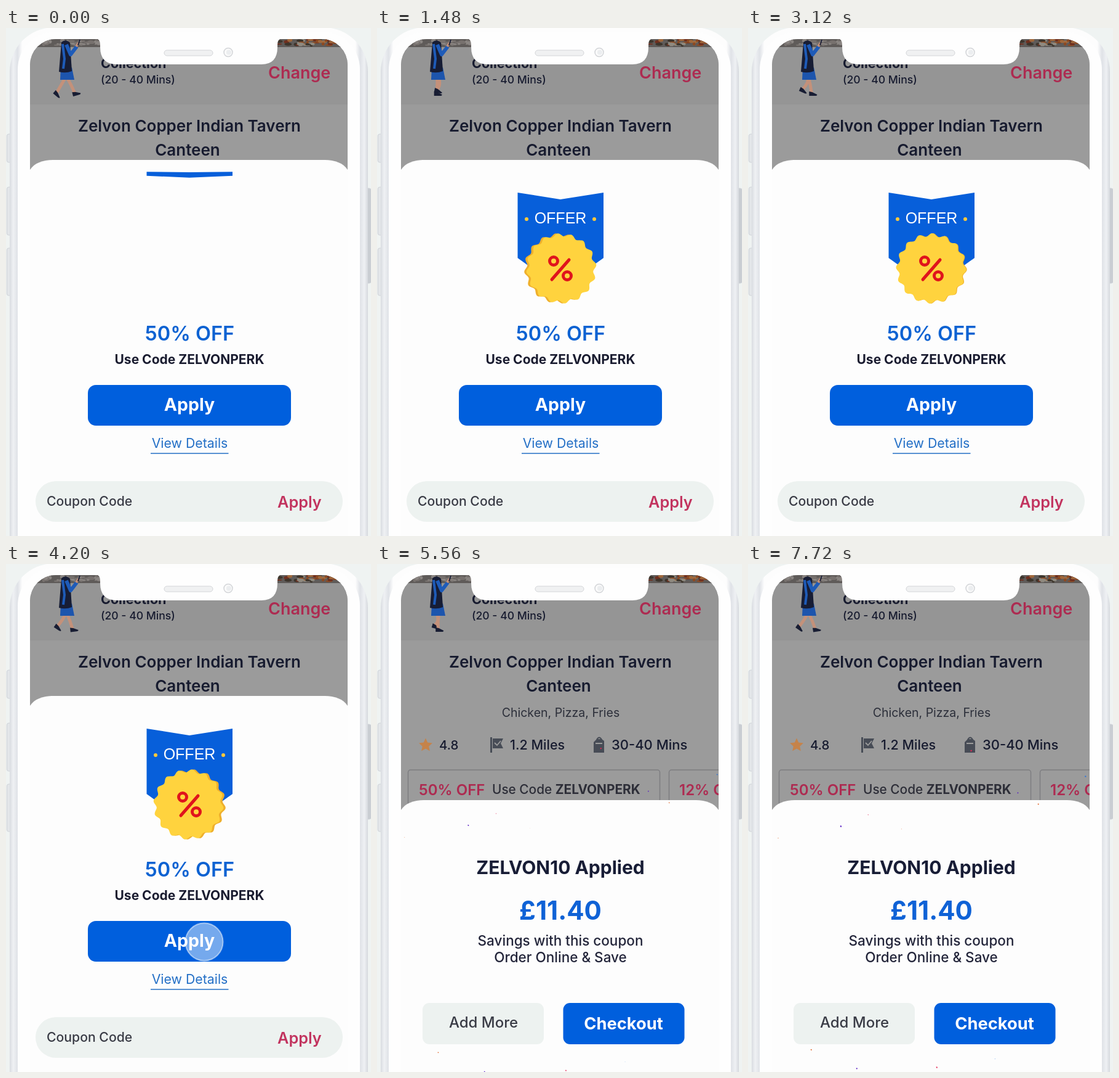
Recreate the animation shown at these times as an HTML page. Size 593 by 824 pixels, loop 7760 ms.

```html
<!DOCTYPE html>
<html lang="en">
<head>
<meta charset="utf-8">
<title>Coupon offer</title>
<style>
  html, body { margin: 0; width: 100%; height: 100%; overflow: hidden; background: #eff3f2; }
  svg { display: block; width: 593px; height: 824px; font-family: Inter, "Open Sans", sans-serif; }
  .mid { text-anchor: middle; }
  .m { font-weight: 500; }
  .s { font-weight: 600; }
  .b { font-weight: 700; }
</style>
</head>
<body>
<svg viewBox="0 0 593 824" xmlns="http://www.w3.org/2000/svg">
  <defs>
    <clipPath id="screen"><rect x="39" y="18" width="516" height="900" rx="42"/></clipPath>
    <linearGradient id="edge">
      <stop offset="0" stop-color="#d9dce1"/><stop offset=".01" stop-color="#eff1f4"/>
      <stop offset=".022" stop-color="#dfe2e7"/><stop offset=".035" stop-color="#fdfdfd"/>
      <stop offset=".965" stop-color="#fdfdfd"/><stop offset=".978" stop-color="#dfe2e7"/>
      <stop offset=".99" stop-color="#eff1f4"/><stop offset="1" stop-color="#d5d8dd"/>
    </linearGradient>
    <path id="sheet" d="M39 16 C46 5 60 0 76 0 H518 C534 0 548 5 555 16 V900 H39 Z" fill="#fdfdfd"/>
  </defs>

  <rect width="593" height="824" fill="#eff3f2"/>
  <g fill="#e3e6e9" stroke="#cfd3d8">
    <rect x="1.5" y="172" width="8" height="46" rx="3"/>
    <rect x="1.5" y="258" width="8" height="78" rx="3"/>
    <rect x="1.5" y="357" width="8" height="77" rx="3"/>
    <rect x="584" y="260" width="9" height="154" rx="3" fill="#c9cdd2"/>
  </g>
  <rect x="6" y="-1" width="582" height="1000" rx="72" fill="url(#edge)"/>
  <rect x="19" y="6" width="556" height="1000" rx="61" fill="#fefefe"/>

  <g clip-path="url(#screen)">
    <rect x="39" y="18" width="516" height="806" fill="#9b9b9b"/>
    <rect x="39" y="18" width="516" height="106" fill="#959595"/>
    <rect x="39" y="18" width="516" height="13" fill="#5f5b59"/>
    <g id="photo"></g>

    <g id="walker">
      <g id="legs" fill="none" stroke="#c4917a" stroke-width="5" stroke-linecap="round"></g>
      <path d="M89 64H107L111 84H88Z" fill="#1d55ad"/>
      <path d="M90 23 Q97 17 104 24 L107 70 Q97 74 86 71Z" fill="#171d35"/>
      <path d="M98 27 L105 43 L115 30" fill="none" stroke="#1e5bb8" stroke-width="6" stroke-linejoin="round"/>
      <path d="M92 26 L95 50 L93 66" fill="none" stroke="#1e5bb8" stroke-width="4"/>
      <path d="M114 30 L118 24" stroke="#c4917a" stroke-width="4"/>
      <path d="M117 28 L120 19" stroke="#20243a" stroke-width="2"/>
    </g>

    <g fill="#171b2f">
      <text class="b" x="154" y="65" font-size="21.5">Collection</text>
      <text class="m" x="154" y="90" font-size="17.6">(20 - 40 Mins)</text>
      <g class="mid s" font-size="26">
        <text x="298" y="168">Zelvon Copper Indian Tavern</text>
        <text x="295" y="207">Canteen</text>
      </g>
      <text class="mid" x="298.5" y="248" font-size="19.5" fill="#2c2f3a">Chicken, Pizza, Fries</text>
      <g class="m" font-size="21.5">
        <text x="101" y="301" font-size="20.5">4.8</text>
        <text x="216" y="301">1.2 Miles</text>
        <text x="381" y="301" font-size="22">30-40 Mins</text>
      </g>
    </g>
    <text class="s" x="426" y="82" font-size="27" fill="#ad2b51">Change</text>
    <path id="star" fill="#c5834a"/>
    <g fill="#474c56">
      <path d="M184 281h3v25h-3z M188 283h17l-4 8 4 8h-17z"/>
      <path d="M354 287l3-3h8l4 3v19h-17v-17z"/>
      <path d="M357 285q4-7 8 0" fill="none" stroke="#474c56" stroke-width="2"/>
    </g>
    <path d="M191 290l4 4 6-7M355 291h11" fill="none" stroke="#9b9b9b" stroke-width="1.8"/>
    <g fill="none" stroke="#7d7d80" stroke-width="1.5">
      <rect x="50.500" y="334" width="409" height="70" rx="4"/>
      <rect x="474.500" y="334" width="409" height="70" rx="4"/>
    </g>
    <g class="s" font-size="24" fill="#ad2b51">
      <text x="68" y="375">50% OFF</text><text x="491" y="375">12% OFF</text>
    </g>
    <text x="187" y="373" font-size="20.8" fill="#2d2e38"><tspan class="m">Use Code </tspan><tspan class="b">ZELVONPERK</tspan></text>

    <g id="offer">
      <use href="#sheet" y="214"/>
      <g id="ribbon">
        <path d="M-69.500 0L0 11L70 0V106L0 156L-69.500 106Z" fill="#075fda"/>
        <g id="label">
          <text class="mid" y="50" font-size="25" fill="#fff" style="font-family:'Liberation Sans',Arial,sans-serif">OFFER</text>
          <g fill="#ffc93a"><circle cx="-55" cy="43" r="3"/><circle cx="55" cy="43" r="3"/></g>
        </g>
      </g>
      <g id="seal">
        <path id="sealBack" fill="#efb02c"/>
        <path id="sealFront" fill="#ffd33e"/>
        <g fill="none" stroke="#e0141c" stroke-width="5" stroke-linecap="round">
          <circle cx="-11" cy="-12" r="6.500"/><circle cx="11" cy="12" r="6.500"/>
          <path d="M14 -14L-14 18"/>
        </g>
      </g>
      <g class="mid">
        <text class="s" x="298.5" y="507" font-size="32.5" fill="#0d62d2">50% OFF</text>
        <text class="b" x="298" y="545" font-size="21" fill="#1a1c30">Use Code ZELVONPERK</text>
        <rect x="133" y="579" width="330" height="66" rx="13" fill="#005fdd"/>
        <text class="b" x="298" y="621" font-size="28.500" fill="#fff">Apply</text>
        <text x="298.5" y="681" font-size="21.300" fill="#236fc6">View Details</text>
      </g>
      <path d="M235 690H361.500" stroke="#236fc6" stroke-width="1.6"/>
      <rect x="48" y="735" width="499" height="66" rx="33" fill="#edf2f0"/>
      <text class="m" x="66" y="775" font-size="21.200" fill="#393b45">Coupon Code</text>
      <text class="s" x="441" y="778" font-size="25.300" fill="#c2345f">Apply</text>
      <circle id="touch" r="30.5" fill="#fff" fill-opacity=".46" stroke="#fff" stroke-opacity=".5" stroke-width="2"/>
    </g>

    <g id="applied">
      <use href="#sheet" y="383"/>
      <g class="mid">
        <text class="b" x="298" y="503" font-size="30" fill="#181d36">ZELVON10 Applied</text>
        <text class="b" x="298" y="577" font-size="42" fill="#0f62d6">£11.40</text>
        <g class="m" font-size="22.500" fill="#23253a">
          <text x="298" y="619">Savings with this coupon</text>
          <text x="298" y="646">Order Online &amp; Save</text>
        </g>
      </g>
      <g id="confetti"></g>
      <g class="mid">
        <rect x="74" y="712" width="197" height="67" rx="11" fill="#edf2f0"/>
        <rect x="302.500" y="712" width="197" height="67" rx="11" fill="#005fdd"/>
        <text class="m" x="173" y="752" font-size="24" fill="#393b45">Add More</text>
        <text class="b" x="400.500" y="755" font-size="27.300" fill="#fff">Checkout</text>
      </g>
    </g>
  </g>

  <path d="M146 17H448Q441 18 441 27V31Q441 59 415 59H180Q153 59 153 31V27Q153 18 146 17Z" fill="#fefefe"/>
  <rect x="257" y="36" width="79" height="9" rx="4.500" fill="#f0f1f2" stroke="#d3d5d8"/>
  <circle cx="361" cy="39.500" r="7" fill="#fafafa" stroke="#d3d5d8" stroke-width="1.500"/>
  <circle cx="362" cy="39.500" r="4" fill="#eceef0"/>
</svg>
<script>
const LOOP = 7760, STEP = 590;
const SWITCH = 4300, BURST = 4600, BURST_EVERY = 2200, BURST_LIFE = 1500;
const NS = 'http://www.w3.org/2000/svg';
const $ = id => document.getElementById(id);
const clamp = v => Math.min(1, Math.max(0, v));
const span = (t, from, to) => clamp((t - from) / (to - from));
const easeOut = p => 1 - (1 - p) ** 3;
const easeBack = p => 1 + 2.4 * (p - 1) ** 3 + 1.4 * (p - 1) ** 2;
const mix = (a, b, p) => a + (b - a) * p;

function add(parent, tag, attrs) {
  const el = document.createElementNS(NS, tag);
  for (const key in attrs) el.setAttribute(key, attrs[key]);
  return parent.appendChild(el);
}
const move = (el, value) => el.setAttribute('transform', value);

let seed = 11;
const random = () => (seed = seed * 16807 % 2147483647) / 2147483647;

// Closed outline around the origin, radius given by angle.
function outline(count, radius, cx = 0, cy = 0) {
  const points = Array.from({ length: count }, (_, i) => {
    const a = i / count * 2 * Math.PI - Math.PI / 2, r = radius(a, i);
    return (cx + r * Math.cos(a)).toFixed(1) + ' ' + (cy + r * Math.sin(a)).toFixed(1);
  });
  return 'M' + points.join('L') + 'Z';
}
const scallop = outline(160, a => 54.5 + 2.6 * Math.cos(16 * a));
$('sealBack').setAttribute('d', scallop);
$('sealFront').setAttribute('d', scallop);
$('star').setAttribute('d', outline(10, (a, i) => i % 2 ? 5.5 : 11.5, 79, 294));

const warm = ['#8d4a22', '#3d352c', '#a0683c', '#6e2f1f', '#8f8a80'];
const grey = ['#77716e', '#4d4948', '#8a8582', '#6a4f48'];
for (let i = 0; i < 90; i++) {
  const right = i % 2, colors = right ? warm : grey;
  add($('photo'), 'ellipse', {
    cx: (right ? 442 : 54) + random() * 98, cy: 19 + random() * 9,
    rx: 2 + random() * 4, ry: 1 + random() * 2, fill: colors[i % colors.length]
  });
}

const legs = [0, 1].map(() => ({
  limb: add($('legs'), 'path', {}),
  shoe: add($('legs'), 'path', { d: 'M-4 -3L1 -2L9 2Q9 4 6 4H-4Z', fill: '#181d33', stroke: 'none' })
}));
function poseLeg({ limb, shoe }, u) {
  const planted = u < 1, s = planted ? u : u - 1;
  const glide = s * s * (3 - 2 * s);
  const x = 97 + (planted ? mix(15, -15, s) : mix(-15, 15, glide));
  const y = 106 - (planted ? 0 : 6 * Math.sin(Math.PI * s ** 0.6));
  const tilt = planted ? mix(-15, 0, clamp(s * 5)) + 40 * span(s, 0.75, 1) : mix(40, -15, s);
  const knee = planted ? 1 : 8 * Math.sin(Math.PI * s);
  limb.setAttribute('d', `M98 78Q${(98 + x) / 2 + knee} ${(78 + y) / 2} ${x} ${y}`);
  move(shoe, `translate(${x} ${y}) rotate(${tilt})`);
}

// Early burst offsets from the centre, in reading order.
const CENTER = [297, 592];
const starts = [
  [-37, -72], [-18, -66], [15, -69], [46, -76], [56, -58], [43, -53], [-44, -54], [-65, -42],
  [-65, 23], [67, 25], [-52, 49], [-27, 55], [57, 56], [3, 65], [-40, 71], [39, 74]
];
const paint = { r: '#e22a55', o: '#e0662a', p: '#5b22c4', b: '#1d6fe0' };
const pieces = [...'rorpbopobroopr pb'.replace(' ', '')].map((c, i) => ({
  el: add($('confetti'), 'path', { d: 'M-6 -2L2 -5L6 3L-2 5Z', fill: paint[c] }),
  start: starts[i], speed: 0.75 + random() * 0.6, spin: random() * 2 - 1, size: 0.75 + random() * 0.4
}));
function drawConfetti(t) {
  const age = (t - BURST) % BURST_EVERY;
  const visible = t >= BURST && age < BURST_LIFE;
  $('confetti').style.display = visible ? '' : 'none';
  if (!visible) return;
  const reach = 4.2 * (1 - Math.exp(-age / 580));
  const late = span(age, 160, BURST_LIFE);
  for (const { el, start, speed, spin, size } of pieces) {
    const k = reach * mix(1, speed, clamp(late * 2));
    const scale = size * span(age, 0, 100) * clamp(1 - late ** 0.9 * (1.1 + Math.abs(spin) * 0.4));
    const x = CENTER[0] + start[0] * k, y = CENTER[1] + start[1] * k + 40 * late * late;
    move(el, `translate(${x} ${y}) rotate(${spin * (age - 160) * 0.4}) scale(${scale})`);
  }
}

function drawOffer(t) {
  const drop = easeBack(span(t, 0, 480));
  move($('ribbon'), `translate(298 ${mix(233, 267, drop)}) scale(1 ${mix(0.052, 1, drop)})`);
  $('label').setAttribute('opacity', span(t, 200, 380));
  const pop = easeBack(span(t, 320, 720));
  const sway = -Math.cos((t - 1480) / 2720 * Math.PI);
  move($('seal'), `translate(298 390) scale(${Math.max(0, pop)})`);
  $('seal').style.display = t < 320 ? 'none' : '';
  move($('sealBack'), `translate(${sway * 2} 0) rotate(${sway * 6})`);
  move($('sealFront'), `translate(${-sway * 1.5} 0) rotate(${sway * 6})`);
  const press = span(t, 3850, 4050) - span(t, 4240, 4360);
  $('touch').setAttribute('opacity', press);
  move($('touch'), `translate(322 613) scale(${mix(1.25, 1, press)})`);
}

function draw(t) {
  poseLeg(legs[0], t / STEP % 2);
  poseLeg(legs[1], (t / STEP + 1) % 2);
  const leave = span(t, SWITCH, SWITCH + 140) ** 2;
  const enter = easeOut(span(t, SWITCH + 100, SWITCH + 320));
  move($('offer'), `translate(0 ${leave * 620})`);
  move($('applied'), `translate(0 ${(1 - enter) * 450})`);
  drawOffer(t);
  drawConfetti(t);
}

const begin = performance.now();
function tick(now) {
  draw(Math.max(0, now - begin) % LOOP);
  requestAnimationFrame(tick);
}
draw(0);
requestAnimationFrame(tick);
</script>
</body>
</html>
```
